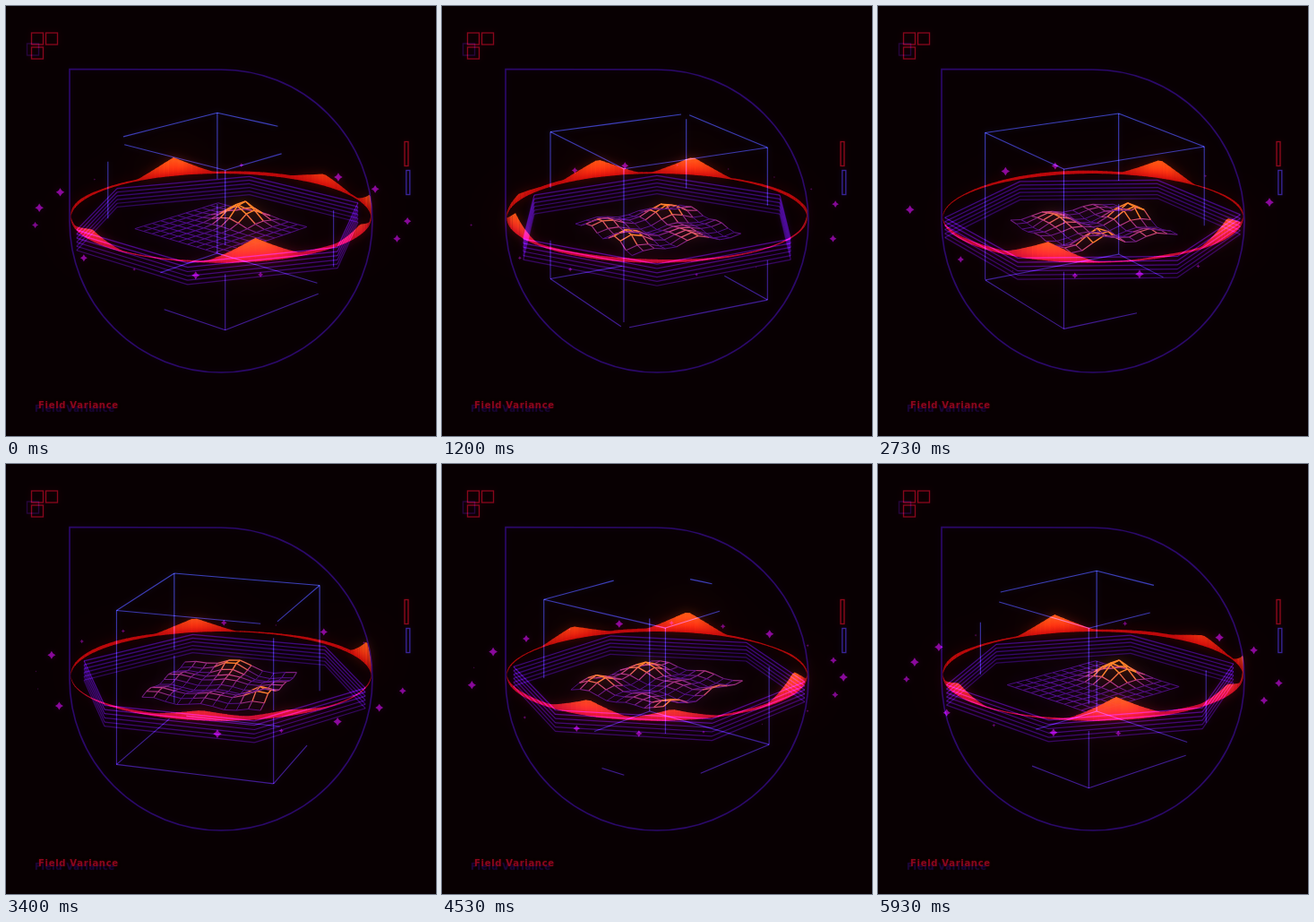
An HTML page with a canvas that plays this animation: 480 px wide and 480 px high, repeating every 5990 ms.

```html
<!DOCTYPE html>
<html lang="en">
<head>
<meta charset="utf-8">
<title>Field Variance</title>
<style>
  html, body { margin: 0; width: 100%; height: 100%; overflow: hidden; background: #080002; }
  canvas { position: absolute; left: 0; top: 0; width: 480px; height: 480px; }
  p { position: absolute; left: 36px; top: 439px; margin: 0; white-space: nowrap;
      font: bold 10px/13px "DejaVu Sans", sans-serif; letter-spacing: .7px; color: #8c061c;
      text-shadow: -4px 4px 1px #1c063e, 0 0 3px #60001088; }
</style>
</head>
<body>
<canvas id="stage" width="480" height="480"></canvas>
<p>Field Variance</p>
<script>
const LOOP = 5990, FRAMES = 90, RAD = Math.PI / 180;

// Wave peaks: angle, frame of greatest height
const PEAKS = [
  [12, 1], [93, 16], [133, 12], [222, 21], [180, 34], [347, 43], [255, 47],
  [255, 68], [149, 66], [63, 77], [93, 80], [305, 78], [200, 89]
];
// Surface hills: angle, radius, frame of greatest height, span
const HILLS = [
  [136, 36, 0, 15], [325, 56, 38, 38], [85, 44, 28, 26], [198, 64, 38, 38], [256, 66, 25, 24],
  [93, 86, 68, 22], [275, 47, 75, 15], [355, 67, 75, 15], [156, 76, 75, 15]
];
// Box corners (top 0-3, base 4-7) that vanish around a frame
const BITES = [[1, 0], [7, 0], [5, 20], [7, 41], [4, 67], [2, 67], [5, 76], [3, 76]];

const makeCanvas = () => Object.assign(document.createElement('canvas'), { width: 480, height: 480 });
const stage = document.getElementById('stage').getContext('2d');
const cool = makeCanvas().getContext('2d');
const warm = makeCanvas().getContext('2d');

const clamp = v => Math.max(0, Math.min(1, v));
const mix = (a, b, t) => a.map((v, i) => v + (b[i] - v) * t);
const rgb = (c, a = 1) => `rgba(${c.map(Math.round)},${a})`;
const random = i => { const v = Math.sin(i * 127.1 + 4.7) * 43758.5453; return v - Math.floor(v); };

// Distance around a cycle, and a soft bump that repeats with the loop
const apart = (a, b, cycle) => {
  const d = Math.abs(a - b) % cycle;
  return Math.min(d, cycle - d);
};
const pulse = (n, at, span) => Math.cos(Math.PI / 2 * clamp(apart(n, at, FRAMES) / span)) ** 2;

// x right, z towards the viewer, h downwards
function project(x, z, h) {
  const s = 1 / (1 - z * .000516);
  return [240 + x * s, 232.6 + (h + z * .296) * s];
}
const polar = (deg, r, h) => project(r * Math.sin(deg * RAD), r * Math.cos(deg * RAD), h);

function line(g, a, b, color, width = 1) {
  g.strokeStyle = color;
  g.lineWidth = width;
  g.beginPath();
  g.moveTo(...a);
  g.lineTo(...b);
  g.stroke();
}

function fill(g, points, paint) {
  g.fillStyle = paint;
  g.beginPath();
  points.forEach(p => g.lineTo(...p));
  g.fill();
}

function drop() {
  cool.strokeStyle = '#23086c';
  cool.lineWidth = 1.6;
  cool.beginPath();
  cool.moveTo(71, 70.5);
  cool.lineTo(240, 71);
  cool.arc(240, 240, 169, -Math.PI / 2, Math.PI);
  cool.closePath();
  cool.stroke();
}

function box(n, turn) {
  const paint = cool.createLinearGradient(0, 120, 0, 360);
  paint.addColorStop(0, '#3644c4');
  paint.addColorStop(.5, '#30289a');
  paint.addColorStop(1, '#3c1a98');
  const corner = c => polar(turn + 2 + 90 * c, 126, c < 4 ? -83.5 : 83.5);
  const bite = c => BITES.reduce((m, [at, frame]) => at === c ? Math.max(m, pulse(n, frame, 22) * .48) : m, 0);
  const edge = (i, j, gap = 0) => {
    const a = corner(i), b = corner(j), from = bite(i), to = 1 - bite(j);
    const part = (p, q) => p < q && line(cool, mix(a, b, p), mix(a, b, q), paint, 1.1);
    part(from, Math.min(to, .56 - gap));
    part(Math.max(from, .56 + gap), to);
  };
  for (let j = 0; j < 4; j++) {
    const next = (j + 1) % 4;
    edge(j, next);
    edge(j + 4, next + 4);
    edge(j, j + 4, j % 2 ? 0 : .18 * pulse(n, 20, 40));
  }
}

function walls(turn) {
  for (let i = 0; i < 6; i++) {
    for (let deg = turn - 12; deg < turn + 348; deg += 60) {
      const h = 2 + 4.4 * i, front = (1 + Math.cos((deg + 30) * RAD)) / 2;
      line(cool, polar(deg, 165, h), polar(deg + 60, 165, h),
        rgb(mix([50, 8, 128], [66, 8, 140], front), 1 - i * .06), 1.2);
    }
  }
}

function surface(n, turn) {
  const cells = 10, side = cells + 1, a = (turn + 2) * RAD;
  const ripple = 4 * clamp(apart(n, 0, FRAMES) / 16);
  const hills = HILLS.map(([deg, r, at, span]) =>
    [r * Math.cos(deg * RAD), r * Math.sin(deg * RAD), (31 - r / 4) * pulse(n, at, span)]);
  const grid = Array.from({ length: side * side }, (_, i) => {
    const u = Math.floor(i / side) / cells * 2 - 1, v = i % side / cells * 2 - 1;
    const p = (u + v) * 48, q = (u - v) * 48;
    let up = ripple * Math.sin(p / 13 + turn * RAD * 2) * Math.sin(q / 14 - turn * RAD);
    for (const [x, y, h] of hills) up += h * Math.exp(-((p - x) ** 2 + (q - y) ** 2) / 480);
    return { up, at: project(p * Math.sin(a) + q * Math.cos(a), p * Math.cos(a) - q * Math.sin(a), 15 - up) };
  });
  const low = [62, 12, 124], mid = [178, 58, 124], high = [246, 128, 34];
  const link = (a, b) => {
    const t = clamp((a.up + b.up) / 20);
    const color = t < .4 ? mix(low, mid, t / .4) : mix(mid, high, (t - .4) / .6);
    line(warm, a.at, b.at, rgb(color), 1 + t * .4);
  };
  grid.forEach((node, i) => {
    if (i % side < cells) link(node, grid[i + 1]);
    if (i + side < grid.length) link(node, grid[i + side]);
  });
}

function wave(n, turn) {
  const height = deg => PEAKS.reduce((sum, [at, frame]) =>
    sum + 21 * pulse(n, frame, 24) * clamp(1 - apart(deg, at, 360) / 17) ** 1.15, 0);
  const step = 2;
  for (let deg = 0; deg < 360; deg += step) {
    const phi = deg + turn, end = phi + step + .2;
    const h0 = height(deg), h1 = height(deg + step);
    const band = 2.6 + 1.4 * Math.sin(deg * 3 * RAD);
    const a = polar(phi, 167, 0), b = polar(end, 167, 0);
    const c = polar(end, 167, -band - h1), d = polar(phi, 167, -band - h0);
    const front = clamp(Math.cos(phi * RAD) * 1.5);
    const low = mix([188, 8, 8], [192, 10, 46], front);
    const paint = warm.createLinearGradient(0, Math.max(a[1], b[1]), 0, Math.min(c[1], d[1]) - .1);
    paint.addColorStop(0, rgb(low, .92));
    paint.addColorStop(1, rgb(mix(low, [238, 92, 18], clamp(Math.max(h0, h1) / 18)), .92));
    fill(warm, [a, b, c, d], paint);
  }
}

function sparks(n, turn) {
  for (let i = 0; i < 20; i++) {
    const r = 4.4 * pulse(n, random(i) * FRAMES, 38);
    if (r < .5) continue;
    const [x, y] = polar(11 + 18 * i + turn, 207, 0);
    const points = Array.from({ length: 8 }, (_, c) => {
      const q = c % 2 ? r * .6 : r + .4;
      return [x + q * Math.cos(c * Math.PI / 4), y + q * Math.sin(c * Math.PI / 4)];
    });
    fill(cool, points, rgb(mix([70, 4, 80], [128, 8, 152], clamp(r / 3.5))));
  }
}

function marks() {
  const frame = (x, y, w, h, color) => {
    cool.strokeStyle = color;
    cool.lineWidth = 1.3;
    cool.strokeRect(x, y, w, h);
  };
  frame(23.5, 42, 13, 13, '#1c063e');
  for (const [x, y] of [[28.5, 30], [44.5, 30], [28.5, 46]]) frame(x, y, 13, 13, '#84061a');
  frame(445, 151.5, 4, 27, '#8c081a');
  frame(446.8, 183.5, 4, 27, '#30249a');
}

function add(layer, alpha, blur) {
  stage.filter = blur ? `blur(${blur}px)` : 'none';
  stage.globalAlpha = alpha;
  stage.drawImage(layer.canvas, 0, 0);
}

function draw(n) {
  const turn = n * 360 / FRAMES;
  for (const g of [cool, warm]) g.clearRect(0, 0, 480, 480);
  cool.globalCompositeOperation = 'lighter';
  drop();
  box(n, turn);
  walls(turn);
  sparks(n, turn);
  marks();
  surface(n, turn);
  wave(n, turn);

  stage.globalCompositeOperation = 'source-over';
  stage.filter = 'none';
  stage.globalAlpha = 1;
  stage.fillStyle = '#080002';
  stage.fillRect(0, 0, 480, 480);
  stage.globalCompositeOperation = 'lighter';
  add(cool, .92);
  add(cool, .25, 3);
  add(warm, .95);
  add(warm, .3, 6);
  add(warm, .25, 26);
}

const start = performance.now();
let shown = -1;
function tick() {
  const t = (performance.now() - start) % LOOP;
  const n = Math.min(FRAMES - 1, Math.floor((t + 4) * .015));
  if (n !== shown) draw(shown = n);
  requestAnimationFrame(tick);
}
tick();
</script>
</body>
</html>
```
